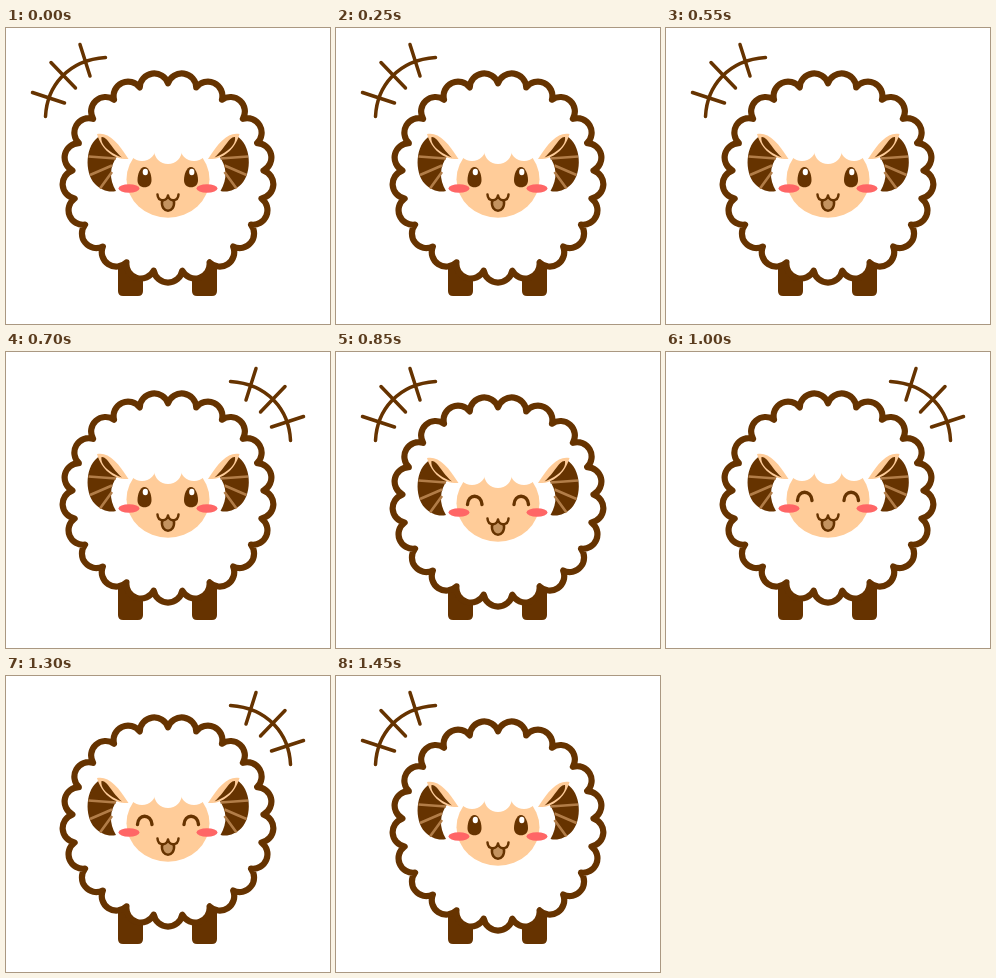
Recreate the animation shown at these times as an HTML page. Size 324x296 px, loop 1.5 s.

```html
<!DOCTYPE html>
<html lang="en">
<head>
<meta charset="utf-8">
<title>Happy sheep</title>
<style>
  html, body { margin: 0; width: 100%; height: 100%; overflow: hidden; background: #fff; }
  svg { display: block; width: 324px; height: 296px; }
  .dark { fill: #663300; }
  .skin { fill: #ffcc99; }
  .wool { fill: #fff; }
  .line { fill: none; stroke: #663300; stroke-linecap: round; stroke-linejoin: round; }

  #body { animation: hop 300ms -50ms step-end infinite; }
  #spark { animation: swap 300ms -50ms step-end infinite; }
  #open { animation: open 1500ms -50ms step-end infinite; }
  #shut { animation: shut 1500ms -50ms step-end infinite; }

  @keyframes hop { 0%, 100% { transform: none; } 50% { transform: translateY(-4px); } }
  @keyframes swap { 0%, 100% { transform: none; } 50% { transform: translateX(324px) scaleX(-1); } }
  @keyframes open { 0%, 100% { opacity: 1; } 60% { opacity: 0; } }
  @keyframes shut { 0%, 100% { opacity: 0; } 60% { opacity: 1; } }
</style>
</head>
<body>
<svg viewBox="0 0 324 296">
  <defs>
    <g id="side">
      <path class="dark" d="M94 108C79 116 78 145 89 156C95 162 103 165 110 163C103 151 103 139 112 127Z"/>
      <path d="M82.500 128.500L110 130.500M84 147L106 137.500M94 160.500L106 144" fill="none" stroke="#b27d48" stroke-width="2.600"/>
      <path class="skin" d="M91 106C102 103.500 112 114 122.500 131C109 132 96 123 91 106Z"/>
      <path class="dark" d="M95.500 109C101 108 106 121 116 129.500C106 126 94 118 95.500 109Z"/>
    </g>
    <g id="eye">
      <path class="dark" d="M138.500 139C143 139 145.500 146.500 145.500 152C145.500 157 142.500 159.300 138.500 159.300S131.500 157 131.500 152C131.500 146.500 134 139 138.500 139Z"/>
      <ellipse class="wool" cx="139.300" cy="144" rx="2.600" ry="3.300"/>
    </g>
    <path id="smile" class="line" stroke-width="3.400" d="M131.500 152.500C132 141.500 145 141.500 146 152.500"/>
  </defs>

  <g class="dark">
    <path id="leg" d="M112 225H137V263Q137 268 132 268H117Q112 268 112 263Z"/>
    <use href="#leg" x="74"/>
  </g>

  <g id="body">
    <path id="fleece" class="line" style="fill:#fff" stroke-width="6.200"/>
    <ellipse class="skin" cx="162" cy="151.300" rx="41.500" ry="38.500"/>
    <g class="wool">
      <rect x="116" y="106" width="92" height="15"/>
      <circle cx="136" cy="119" r="14"/>
      <circle cx="162" cy="122" r="14"/>
      <circle cx="188" cy="119" r="14"/>
    </g>
    <use href="#side"/>
    <use href="#side" transform="matrix(-1 0 0 1 324.500 0)"/>
    <g fill="#ff6666">
      <ellipse cx="123" cy="160.500" rx="10.500" ry="4.200"/>
      <ellipse cx="201" cy="160.500" rx="10.500" ry="4.200"/>
    </g>
    <g id="open">
      <use href="#eye"/>
      <use href="#eye" x="46.500"/>
    </g>
    <g id="shut">
      <use href="#smile"/>
      <use href="#smile" x="46.500"/>
    </g>
    <path class="line" style="fill:#c4935f" stroke-width="2.500" d="M156 173C154.500 186 169.500 186 168 173L162 169Z"/>
    <path class="line" style="fill:#ffcc99" stroke-width="2.500" d="M151.500 166.500C152 174 161 174 162 167.500C163 174 172 174 172.500 166.500"/>
  </g>

  <g id="spark" class="line" stroke-width="3.500">
    <path d="M39.500 88.500C41 58 62 32 99.500 29.500M26.500 64.500L58.500 75M45 34.500L69.500 60M74 16.500L84 48"/>
  </g>
</svg>
<script>
  // Scalloped outline: equal arcs between points on an ellipse
  const bumps = 21, bend = 14.5;
  const dent = i => {
    const a = (i - 0.5) * 2 * Math.PI / bumps + Math.PI / 2;
    return (162 + 95.8 * Math.cos(a)).toFixed(2) + " " + (149.5 + 94.2 * Math.sin(a)).toFixed(2);
  };
  let d = "M" + dent(0);
  for (let i = 1; i <= bumps; i++) d += `A${bend} ${bend} 0 0 1 ${dent(i)}`;
  document.getElementById("fleece").setAttribute("d", d + "Z");
</script>
</body>
</html>
```
